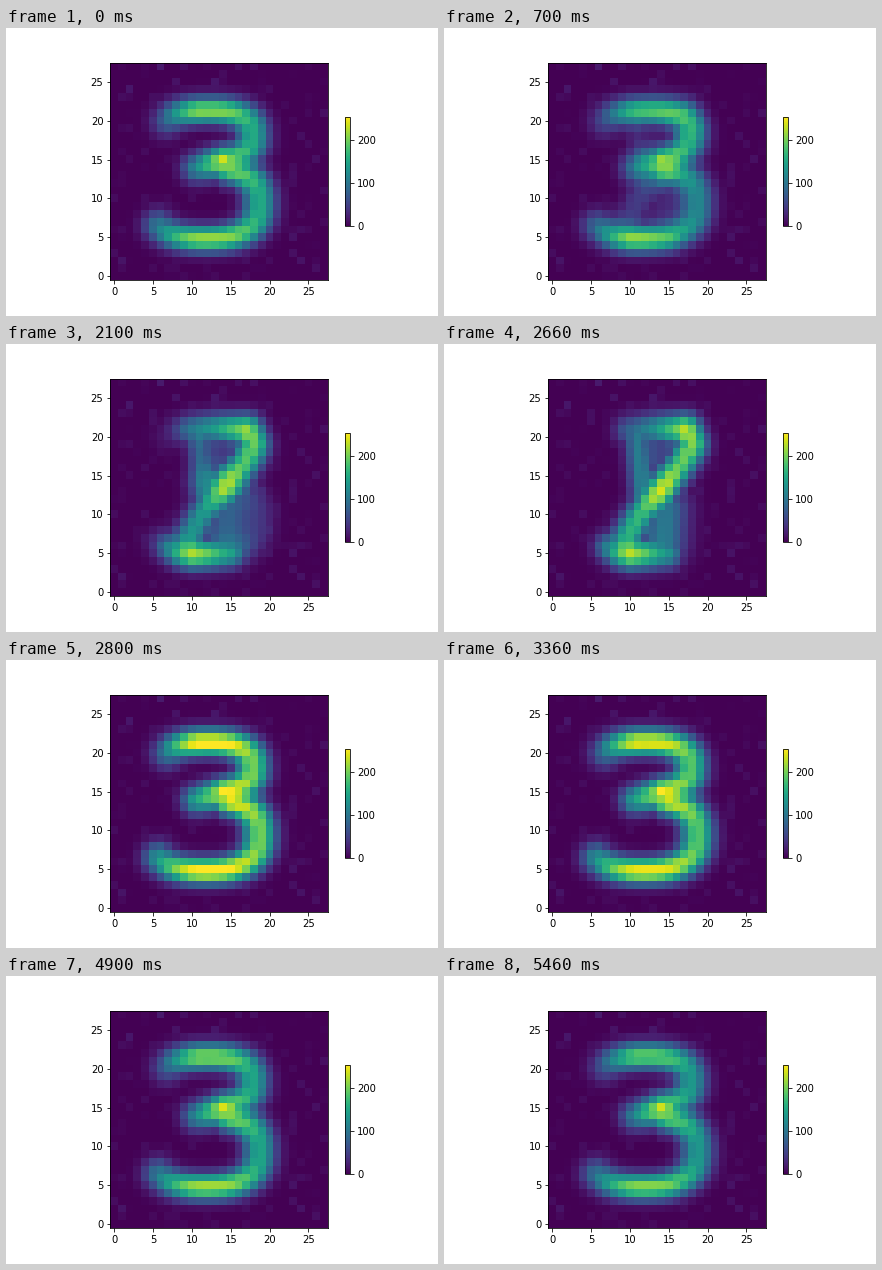
Animation of 432x288 px, one loop 5600 ms. Source, as a matplotlib script:

```python
import numpy as np
import matplotlib.pyplot as plt
from matplotlib.animation import FuncAnimation

N = 28          # image cells per side
HALF = 20       # frames in each morph
PEAK = 254

gy, gx = np.mgrid[:N, :N]
rng = np.random.default_rng(8)
grain = np.clip(rng.normal(-4, 7, (N, N)), 0, None)


def ink(x, y, a, w):
    """Brightest soft dab along a path, per cell."""
    x, y, a, w = (v[:, None, None] for v in np.broadcast_arrays(x, y, a, w))
    d = np.hypot(gx - x, gy - y)
    return (a * np.exp(-0.5 * (d / w) ** 2.1)).max(axis=0)


def path(points, w, steps=60):
    pts = np.array(points, float)
    u = np.linspace(0, len(pts) - 1, steps)
    x, y, a = (np.interp(u, np.arange(len(pts)), col) for col in pts.T)
    return ink(x, y, a, w)


def arc(cx, cy, rx, ry, tip, end, flat, side, fade):
    """Squarish arc, faint at its open tip, wider where it runs upright."""
    deg = np.linspace(tip, end, 90)
    c, s = np.cos(np.radians(deg)), np.sin(np.radians(deg))
    x = cx + rx * np.sign(c) * np.abs(c) ** 0.8
    y = cy + ry * np.sign(s) * np.abs(s) ** 0.8
    ramp = np.minimum(1, fade + (1 - fade) * np.abs(deg - tip) / 50)
    a = (side + (flat - side) * s ** 2) * ramp
    return ink(x, y, a, 1.55 - 0.35 * s ** 2)


def three(top, low, side, lift=0.0):
    return np.maximum.reduce([
        arc(12, 18.1 + lift, 5.8, 3.2, 150, -75, top, side, 0.45),
        arc(11.7, 9.4, 7, 4.6, -145, 70, low, side, 0.6),
        path([(10.6, 13.9, 0.55 * top), (14.2, 14.8, 240)], 1.35),
        grain])


def slanted():
    spine = [(10, 20.8, 80), (13.5, 21, 130), (17.2, 20.9, 230),
             (18.1, 19, 205), (16.6, 16.5, 195), (13.9, 13, 243),
             (11.6, 10.3, 175), (9.3, 6.5, 165), (9.8, 4.9, 235),
             (14.8, 5, 130)]
    return np.maximum.reduce([
        path(spine, 1.4),
        path([(10.9, 20, 105), (11.7, 13, 115)], 1.2),
        path([(13, 19, 60), (13, 17, 60)], 1.8),
        path([(14.3, 6.5, 105), (14.6, 10.5, 100)], 2.1),
        path([(7.3, 5.8, 110), (9, 5, 190)], 1.35),
        grain])


morphs = [(three(208, 215, 155), slanted()),
          (three(265, 262, 200), three(195, 210, 135, lift=0.3))]


def cells(i):
    a, b = morphs[i // HALF]
    return a + (b - a) * (i % HALF) / (HALF - 1)


fig, ax = plt.subplots(figsize=(6, 4), dpi=72)
fig.subplots_adjust(left=0.125, right=0.9, bottom=0.125, top=0.88)
im = ax.imshow(cells(0), origin="lower", cmap="viridis", vmin=0, vmax=PEAK,
               interpolation="nearest")
fig.colorbar(im, ax=ax, shrink=0.5)


def update(i):
    im.set_data(cells(i))
    return [im]


anim = FuncAnimation(fig, update, frames=2 * HALF, interval=140,
                     repeat=True, repeat_delay=0)
plt.show()
```
